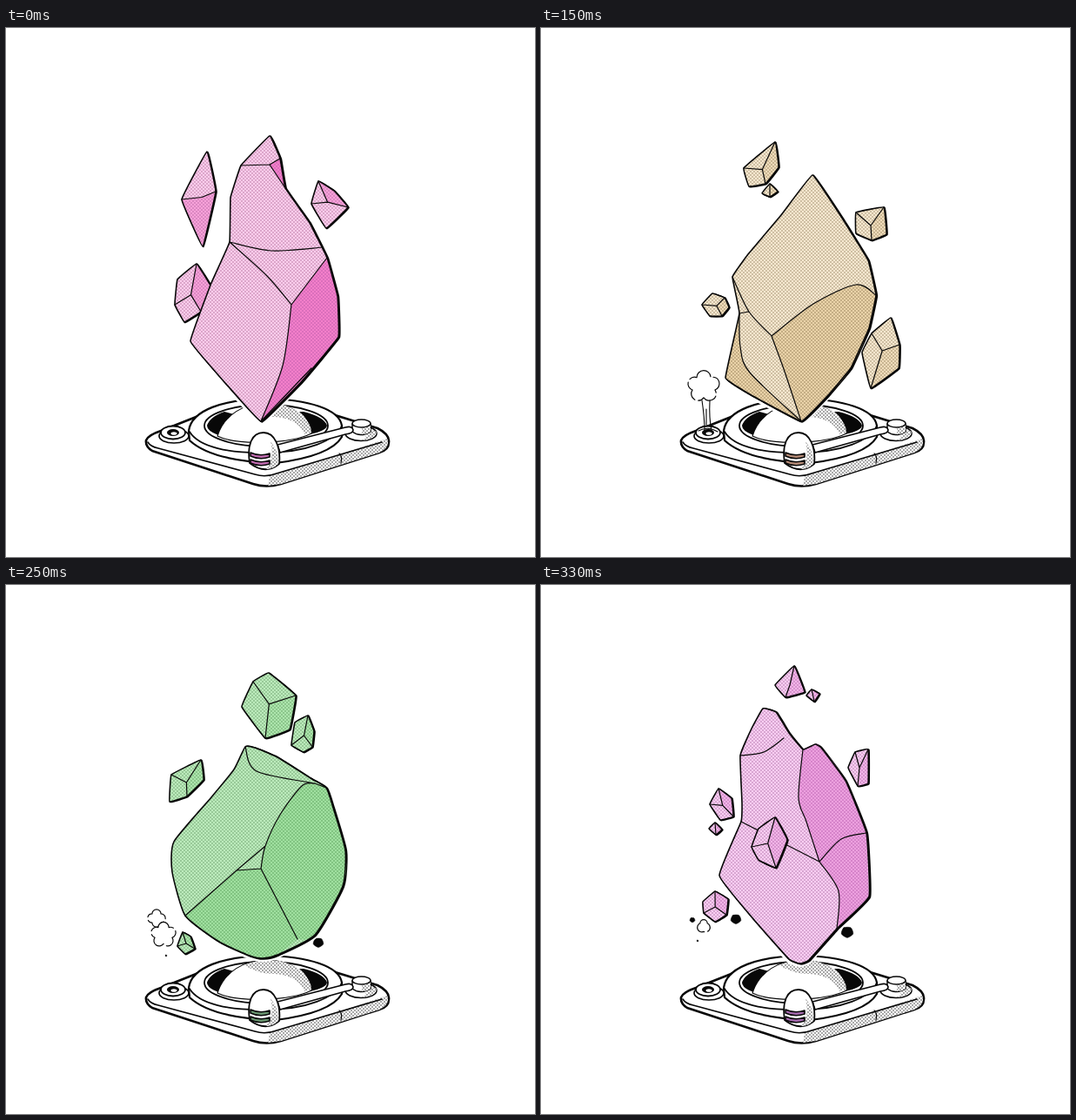
These frames come from a looping animation (608 by 608 pixels, 0.35 s). An HTML page:

```html
<!DOCTYPE html>
<html lang="en">
<head>
<meta charset="utf-8">
<title>Floating stones</title>
<style>
html, body { margin: 0; width: 100%; height: 100%; overflow: hidden; background: #fff; }
svg { display: block; width: 100vw; height: 100vh; }
path { stroke-linejoin: round; stroke-linecap: round; }
</style>
</head>
<body>
<svg id="stage" viewBox="0 0 608 608"></svg>
<script>
const INK = '#080808';

// Stone corners are lettered a, b, c... in order; the first `rim` of them form the outline.
// Lines and faces name the corners they pass through.
const scenes = [
  {
    hold: 150, light: '#fbcdec', deep: '#f37fca', dot: '#ad6b98', deepDot: '#b958a8', stripe: '#c06bb0', behind: true,
    rim: 15, bend: .03,
    corners: '303 124 270 158 258 195 257 246 236 293 212 360 252 408 293 452 340 406 382 355 381 308 369 264 349 224 321 184 315 150 303 157 305 256 364 252 328 318 318 388 300 285 351 391',
    lines: 'bp po pn dqr dus sl sth hv', faces: ['sl lkj jih hts', 'po on np'],
    shards: ['241 188 226 251 202 197 231 142', '359 176 377 187 393 206 368 230 351 202', '219 271 236 298 224 326 205 338 194 318 197 289']
  },
  {
    hold: 50, light: '#f6e8d0', deep: '#ead3a9', dot: '#94815f', deepDot: '#8d784f', stripe: '#b58b77',
    rim: 14, bend: .03,
    corners: '312 169 276 215 238 260 220 286 228 328 212 402 240 421 299 452 330 422 356 391 377 345 385 307 376 267 347 220 265 354 313 317 362 295 279 392 239 326 229 366 240 396',
    lines: 'dso opql orh etuh es', faces: ['opql lkjih hro', 'fe etuh hgf'],
    shards: ['269 131 273 160 258 179 239 182 233 161', '263 179 272 188 263 194 254 190', '394 206 397 237 380 244 362 236 362 212',
      '211 310 216 321 208 331 194 331 185 318 197 305', '412 364 411 391 379 414 369 373 380 351 402 333'],
    clouds: [[187, 412, 17, 16, 5]], steam: true
  },
  {
    hold: 50, light: '#c3e1fb', deep: '#9bc8f5', dot: '#648bb0', deepDot: '#5686b8', stripe: '#7182bd',
    rim: 18, bend: .08,
    corners: '300 169 275 185 240 205 219 221 216 270 218 320 216 361 242 400 275 435 291 444 307 441 343 404 367 361 384 314 376 268 361 213 345 203 318 179 326 230 262 332 315 328 308 360 276 402',
    lines: 'dsq ftun nvwi', faces: ['nvwi ijklmn'],
    shards: ['257 141 270 150 282 176 277 206 251 206 213 187 210 170 226 138', '202 258 212 281 209 288 197 286 192 272',
      '194 292 206 310 209 342 199 354 172 347 160 323', '398 336 415 359 400 385 386 379 378 354', '374 381 383 394 372 404 363 395'],
    chips: [[344, 173, 12], [315, 163, 4]], clouds: [[190, 403, 25, 19, 6], [187, 437, 4, 5, 2]]
  },
  {
    hold: 50, light: '#bcebbc', deep: '#a0e0a0', dot: '#639763', deepDot: '#559a55', stripe: '#6a9670',
    rim: 18, bend: .09,
    corners: '275 186 262 212 236 244 193 295 191 330 206 380 245 410 280 426 295 429 312 425 355 402 387 346 390 305 376 256 368 233 350 222 312 198 286 187 288 214 355 228 340 231 315 264 298 300 293 326 265 328 335 407',
    lines: 'ast to tuvwx fy yw yx xz', faces: ['tuvwx xz zklmno ot', 'fy yx xz zjihgf'],
    shards: ['333 127 326 166 298 176 271 140 284 111 302 101', '347 150 354 168 352 186 342 192 328 184 332 158',
      '224 201 227 224 208 243 188 249 190 218', '203 399 212 404 217 418 206 424 197 415'],
    chips: [[359, 411, 6], [184, 426, 1]], clouds: [[173, 383, 9, 9, 4], [181, 402, 13, 13, 5]]
  },
  {
    hold: 50, light: '#f9cef2', deep: '#eda1df', dot: '#a86ba2', deepDot: '#b458aa', stripe: '#a66aaf',
    rim: 19, bend: .05,
    corners: '255 142 242 165 229 196 231 250 230 272 205 334 245 385 285 430 298 435 308 431 340 395 377 358 374 285 350 225 322 187 315 183 301 189 285 170 270 146 279 176 296 245 305 272 320 318 342 352 256 192 345 292',
    lines: 'cyt quvw ew wzm wxk', faces: ['quvw wzm mnopq', 'wzm ml lk kxw'],
    shards: ['269 267 283 293 270 325 250 316 242 301 250 280', '291 93 303 123 281 129 269 115', '311 120 320 125 314 134 305 127',
      '376 189 376 228 364 231 353 210 361 192', '204 234 219 245 221 266 206 270 194 252', '200 273 208 281 201 287 193 280',
      '200 352 215 361 213 379 200 387 187 377 186 364'],
    chips: [[224, 384, 6], [352, 399, 7], [174, 385, 3], [180, 409, 1]], clouds: [[187, 392, 6, 8, 3]]
  }
];
const twoRibs = 5; // shards outside 5 to 6 corners show a single ridge

const path = (d, fill = 'none', w = 0, extra = '') =>
  `<path d="${d}" fill="${fill}" stroke="${w ? INK : 'none'}" stroke-width="${w}" ${extra}/>`;
const points = text => text.match(/\d+ \d+/g).map(pair => pair.split(' ').map(Number));
const oval = (x, y, rx, ry) => `M${x - rx} ${y}a${rx} ${ry} 0 1 0 ${2 * rx} 0a${rx} ${ry} 0 1 0 ${-2 * rx} 0Z`;

// Smooth path through the points; bend 0 gives straight edges.
function curve(pts, bend, closed) {
  const n = pts.length;
  const at = i => pts[closed ? (i + n) % n : Math.max(0, Math.min(n - 1, i))];
  let d = 'M' + pts[0];
  for (let i = 0; i < (closed ? n : n - 1); i++) {
    const [a, b, c, e] = [-1, 0, 1, 2].map(k => at(i + k));
    const c1 = b.map((v, k) => v + (c[k] - a[k]) * bend);
    const c2 = c.map((v, k) => v - (e[k] - b[k]) * bend);
    d += `C${c1} ${c2} ${c}`;
  }
  return d;
}

function screen(id, back, dot, r) {
  return `<pattern id="${id}" width="4" height="4" patternUnits="userSpaceOnUse"><rect width="4" height="4" fill="${back}"/>` +
    `<circle cx="1" cy="1" r="${r}" fill="${dot}"/><circle cx="3" cy="3" r="${r}" fill="${dot}"/></pattern>`;
}

function solid(id, outline, faces, lines, weight, depth) {
  return path(outline, INK, weight, `transform="translate(${weight * .5} ${weight * .3})"`) +
    path(outline, `url(#light${id})`) +
    path(faces, `url(#deep${id})`, 0, `opacity="${depth}"`) +
    path(lines, 'none', 1.2) + path(outline, 'none', 1.6);
}

function stone(s, id) {
  const pts = points(s.corners);
  const trace = word => curve([...word].map(c => pts[c.charCodeAt(0) - 97]), .15);
  const face = f => f.split(' ').map((w, i) => i ? trace(w).replace('M', 'L') : trace(w)).join('') + 'Z';
  const outline = curve(pts.slice(0, s.rim), s.bend, true);
  const halo = `<path d="${outline}" fill="#fff" stroke="#fff" stroke-width="8"/>`;
  return { halo, body: solid(id, outline, s.faces.map(face).join(''), s.lines.split(' ').map(trace).join(''), 2.2, 1) };
}

// Ridges run from a hub in the middle to evenly spread corners.
function shard(text, id) {
  const pts = points(text), n = pts.length;
  const hub = [0, 1].map(k => pts.reduce((sum, q) => sum + q[k], 0) / n);
  const ribs = n === twoRibs || n === 6 ? 3 : 2;
  const ends = Array.from({ length: ribs }, (_, i) => Math.ceil(i * n / ribs));
  const face = `M${[...pts.slice(0, ends[1] + 1), hub].join('L')}Z`;
  return solid(id, curve(pts, .03, true), face, ends.map(e => `M${hub}L${pts[e]}`).join(''), 1.8, .55);
}

function ring(x, y, rx, ry, n) {
  return Array.from({ length: n }, (_, i) => {
    const a = i * 2 * Math.PI / n - Math.PI / 2 - Math.PI / n;
    return [x + rx * Math.cos(a), y + ry * Math.sin(a)];
  });
}

function cloud([x, y, rx, ry, lobes]) {
  const pts = ring(x, y, rx * .8, ry * .8, lobes);
  const r = rx * 1.8 / lobes;
  const arcs = pts.map((_, i) => `A${r} ${r} 0 0 1 ${pts[(i + 1) % lobes]}`).join('');
  return path(`M${pts[0]}${arcs}`, '#fff', 1.2, 'stroke-dasharray="24 4"');
}

const chip = ([x, y, r]) => path(curve(ring(x, y, r, r * .9, 5), .12, true) + 'Z', INK, .6);
const steam = () => path('M185 428Q188 448 188 463M194 428Q193 448 196 463M190 438V456M181 463Q192 457 203 464', 'none', 1.1);

function device() {
  const tone = 'url(#grey)';
  return [
    path('M178 463 226 444H375L427 460Q441 467 440 476 440 485 429 488L316 524Q299 529 284 524L168 486Q160 481 161 474 163 468 178 463Z', '#fff', 2.6),
    path('M303 515 384 490 438 472Q442 482 429 488L316 524 301 526Z', tone),
    path('M163 476Q166 481 175 483L286 513Q298 517 311 512L432 476', 'none', 1.6),
    path('M383 489Q387 492 385 500', 'none', 1.2),
    // bowl
    path('M210 463C213 439 250 427 298 426 348 427 383 438 386 457V470Q373 492 310 500 237 498 211 474Z', '#fff', 2.2),
    path('M211 464C222 482 257 489 298 488 346 488 379 474 386 457', 'none', 1.7),
    path(oval(299, 457, 71, 24), '#fff', 1.8),
    path('M231 457Q234 447 251 441L262 444Q249 452 244 468 231 463 231 457ZM342 441Q366 447 369 457 368 463 349 467 350 451 337 441Z', INK),
    path('M243 469C251 444 274 431 300 431 326 431 347 445 351 466 327 478 266 480 243 469Z', '#fff', 1.1),
    path('M274 437Q312 422 340 444 351 455 351 465L343 467Q336 449 309 447 289 447 274 437Z', tone),
    // left knob
    path(oval(193, 469, 17, 8), '#fff', 1.7),
    path(oval(192, 465, 14, 7.5), '#fff', 1.8),
    path(oval(192, 465, 7, 4), INK),
    path(oval(193, 466, 3.5, 1.8), '#fff'),
    // right knob and arm
    path(oval(408, 466, 18, 8.5), '#fff', 1.6),
    path('M411 474Q425 472 426 464L418 461Z', tone),
    path('M398 455V464Q407 471 419 464V455Z', '#fff', 1.5),
    path('M409 459 419 456V464Q415 467 409 467Z', tone),
    path(oval(408.5, 454.5, 10.5, 4.5), '#fff', 1.5),
    path('M312 479 390 459Q398 457 399 462 399 466 390 467L315 488Z', '#fff', 1.7),
    // lever head
    path('M280 500C277 480 282 465 296 465 309 465 316 482 314 501Q298 514 280 500Z', '#fff', 1.8),
    path('M304 475Q314 487 313 501 307 507 299 507 309 494 304 475Z', tone)
  ].join('');
}

function draw(s, id) {
  const main = stone(s, id);
  const small = s.shards.map(t => shard(t, id)).join('');
  const stripes = [488, 496].map(y => path(`M281 ${y}q11 5 22 1v4q-11 4-22-1Z`, s.stripe, 1.6)).join('');
  const extras = (s.clouds || []).map(cloud).join('') + (s.steam ? steam() : '') + (s.chips || []).map(chip).join('');
  return `<g>${stripes}${extras}${main.halo}${s.behind ? small + main.body : main.body + small}</g>`;
}

const stage = document.getElementById('stage');
const screens = scenes.map((s, i) => screen('light' + i, s.light, s.dot, .72) + screen('deep' + i, s.deep, s.deepDot, .78));
stage.innerHTML = `<defs>${screen('grey', '#fff', INK, .65)}${screens.join('')}</defs>` +
  device() + `<g id="scenes">${scenes.map(draw).join('')}</g>`;

const groups = [...document.getElementById('scenes').children];
const loop = scenes.reduce((sum, s) => sum + s.hold, 0);

function show(time) {
  let t = time % loop, now = 0;
  while (t >= scenes[now].hold) t -= scenes[now++].hold;
  groups.forEach((g, i) => g.setAttribute('visibility', i === now ? 'visible' : 'hidden'));
}

const start = performance.now();
function tick() {
  show(performance.now() - start);
  requestAnimationFrame(tick);
}
tick();
</script>
</body>
</html>
```
